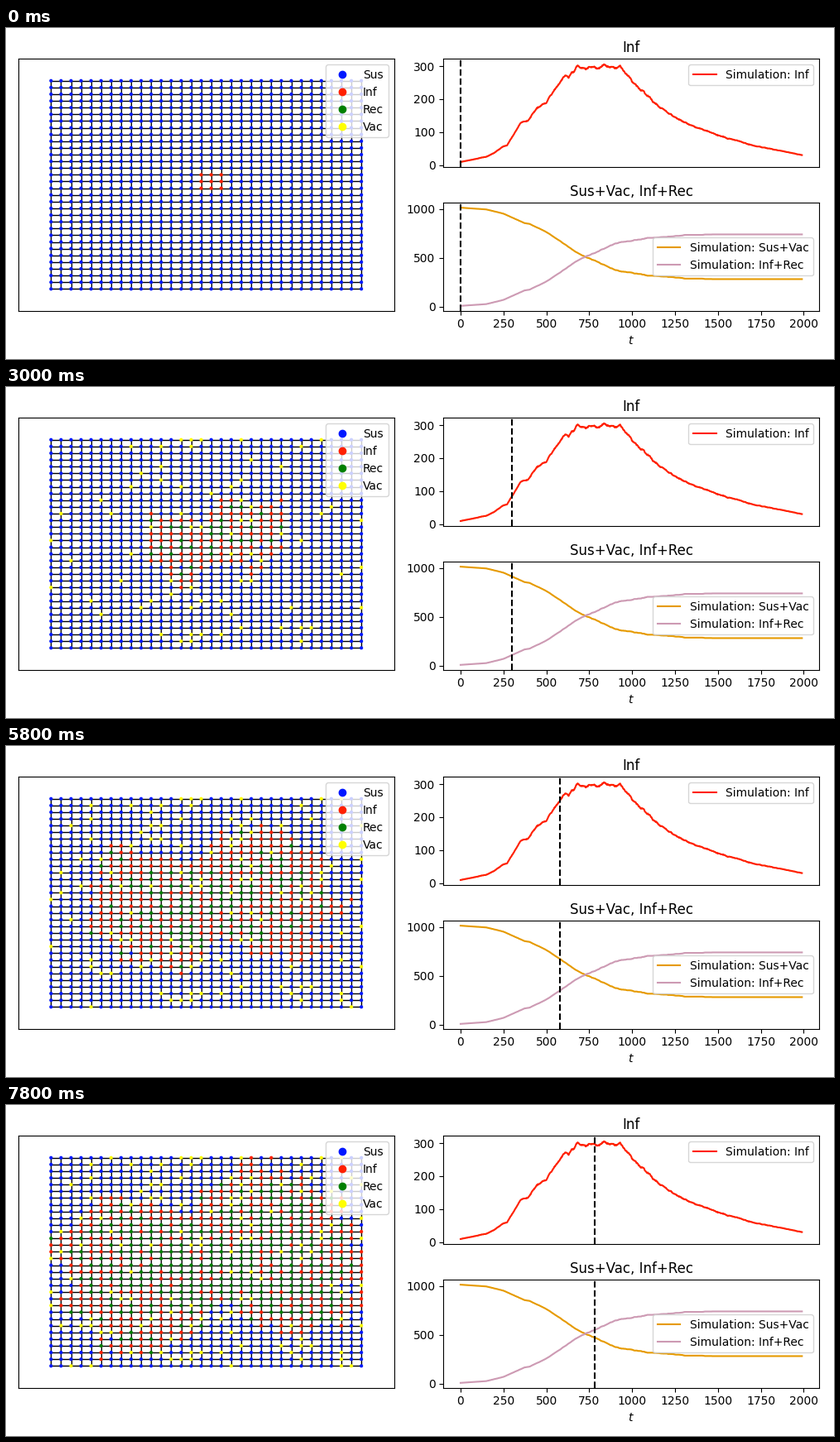
These frames come from a looping animation (1000x400 px, 8000 ms). A matplotlib script:

```python
import numpy as np
import matplotlib.pyplot as plt
from matplotlib.animation import FuncAnimation
from matplotlib.collections import LineCollection
from matplotlib.colors import to_rgba

N = 32
FRAMES, INTERVAL, STEP = 40, 200, 20
SUS, INF, REC, VAC = range(4)
NAMES = ["Sus", "Inf", "Rec", "Vac"]
COLORS = ["#0018ff", "#ff2000", "green", "yellow"]
RGBA = np.array([to_rgba(c) for c in COLORS])

rng = np.random.default_rng(5)
time = np.arange(0, 1991, 2)

# Key points (time, count) of the two recorded curves
INF_KEYS = [(0, 9), (150, 25), (200, 38), (250, 57), (270, 58), (350, 128),
            (390, 133), (455, 177), (500, 190), (600, 268), (640, 273),
            (690, 303), (720, 294), (760, 297), (810, 291), (840, 304),
            (880, 293), (930, 297), (1000, 255), (1150, 181), (1250, 143),
            (1300, 130), (1500, 90), (1700, 60), (1990, 30)]
EVER_KEYS = [(0, 9), (150, 27), (250, 70), (370, 165), (400, 174), (500, 257),
             (690, 482), (900, 645), (935, 664), (990, 673), (1100, 705),
             (1300, 728), (1490, 741), (1990, 741)]


def curve(keys, roughness):
    """Trend through the key points with jitter in proportion to its height."""
    trend = np.interp(time, *zip(*keys))
    jitter = np.convolve(rng.normal(0, 1, time.size), np.ones(9) / 9, "same")
    return np.round(trend * (1 + roughness * jitter)).astype(int)


inf = np.clip(curve(INF_KEYS, 0.025), 9, 307)
ever = np.clip(np.maximum.accumulate(curve(EVER_KEYS, 0.01)), 9, 741)
inf[0] = ever[0] = 9


def spread_order():
    """Nodes in the order the infection reaches them."""
    x, y = np.meshgrid(np.arange(N) - 16, np.arange(N) - 16)
    angle = np.degrees(np.arctan2(y, x))

    def dip(center):
        off = (angle - center + 180) % 360 - 180
        return 0.55 * np.exp(-(off / 24) ** 2)

    rough = rng.normal(0, 1, (N + 2, N + 2))
    smooth = sum(rough[i:i + N, j:j + N] for i in range(3) for j in range(3))
    score = np.hypot(x, y) / (1 - dip(108) - dip(-80))
    score += 0.35 * smooth + rng.normal(0, 0.5, (N, N))
    score[(abs(x) <= 1) & (abs(y) <= 1)] = -10
    return np.argsort(score, axis=None)


def simulate():
    """State of every node at each step, with totals that follow the curves."""
    order = spread_order()
    state = np.full(N * N, SUS)
    history = []

    def convert(candidates, total, new):
        missing = max(0, total - np.count_nonzero(state == new))
        state[candidates[:missing]] = new

    for t in range(0, FRAMES * STEP, STEP):
        k = t // 2
        reached = np.count_nonzero((state == INF) | (state == REC))
        healthy = order[state[order] == SUS]
        state[healthy[:max(0, ever[k] - reached)]] = INF
        sick = rng.permutation(np.flatnonzero(state == INF))
        convert(sick, ever[k] - inf[k], REC)
        healthy = rng.permutation(np.flatnonzero(state == SUS))
        convert(healthy, int(150 * (1 - np.exp(-t / 450))), VAC)
        history.append(state.copy())
    return history


history = simulate()

fig = plt.figure(figsize=(10, 4), dpi=100)
net, top, low = (fig.add_subplot(code) for code in (121, 222, 224))

# Network
last = N - 1
grid = [[(0, k), (last, k)] for k in range(N)]
grid += [[(k, 0), (k, last)] for k in range(N)]
net.add_collection(LineCollection(grid, colors="black", linewidths=1, zorder=1))
rows, cols = np.divmod(np.arange(N * N), N)
dots = net.scatter(cols, rows, s=4, linewidths=1, zorder=2)
for name, color in zip(NAMES, COLORS):
    net.plot([], [], "o", color=color, label=name)
margin = 0.105 * last
net.set(xlim=(-margin, last + margin), ylim=(-margin, last + margin),
        xticks=[], yticks=[])
net.legend(loc="upper right")

# Time series
top.plot(time, inf, color="#FF2000", label="Simulation: Inf")
top.set(title="Inf", xticks=[], yticks=range(0, 301, 100), ylim=(-5.9, 321.9))
top.legend(loc="upper right")

low.plot(time, N * N - ever, color="#E69A00", label="Simulation: Sus+Vac")
low.plot(time, ever, color="#CD9AB3", label="Simulation: Inf+Rec")
low.set(title="Sus+Vac, Inf+Rec", xlabel="$t$", xticks=range(0, 2001, 250),
        yticks=[0, 500, 1000], ylim=(-41.3, 1065.3))
low.legend(loc="center right")

markers = []
for ax in (top, low):
    ax.set_xlim(-99.5, 2089.5)
    markers.append(ax.axvline(0, color="black", linestyle="--"))

fig.tight_layout()


def draw(i):
    dots.set_color(RGBA[history[i]])
    for m in markers:
        m.set_xdata([i * STEP, i * STEP])
    return [dots, *markers]


anim = FuncAnimation(fig, draw, frames=FRAMES, interval=INTERVAL, repeat=True,
                     repeat_delay=0, blit=False)
plt.show()
```
